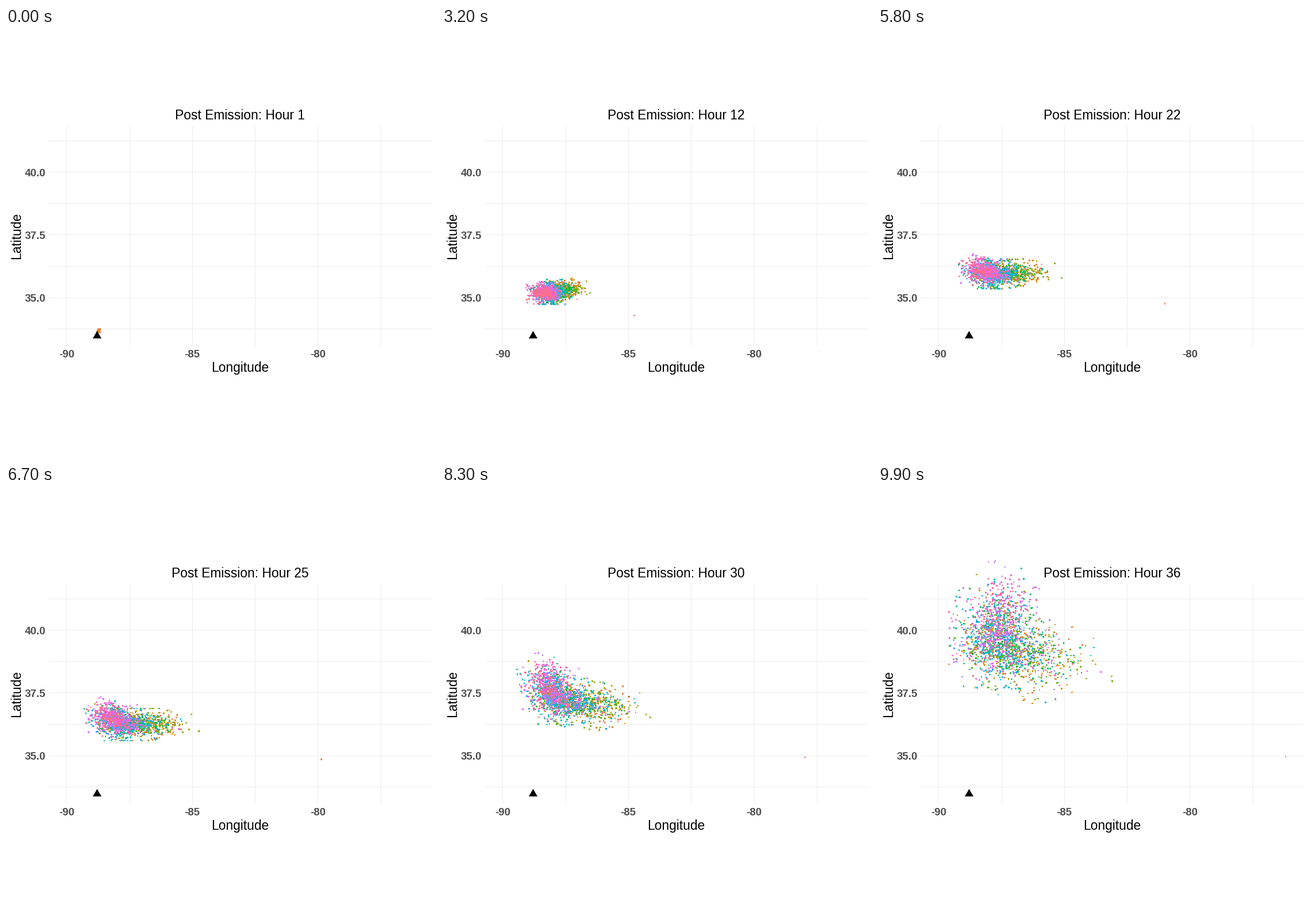
Recreate the animation shown at these times as a matplotlib script. Size 748x748 px, loop 10000 ms.

```python
import numpy as np
import matplotlib.pyplot as plt
from matplotlib.animation import FuncAnimation

SIZE, DPI, FRAMES = 748, 100, 100
HOURS, COUNT = 36, 2000
PX = 72 / DPI
plt.rcParams["font.family"] = "Liberation Sans"
rng = np.random.default_rng(11)

# ---------- stage ----------
fig = plt.figure(figsize=(SIZE / DPI, SIZE / DPI), dpi=DPI, facecolor="white")
ax = fig.add_axes([0, 0, 1, 1])
ax.set(xlim=(0, SIZE), ylim=(SIZE, 0))
ax.axis("off")


def lon_x(lon):
    return 105.3 + (lon + 90) * 43.7


def lat_y(lat):
    return 250.3 + (40 - lat) * 43.66


def label(x, y, text, size=22.8, **kw):
    kw = {"ha": "center", "va": "baseline", "color": "black", **kw}
    return ax.text(x, y, text, fontsize=size * PX, **kw)


grid = dict(color="#ebebeb", lw=PX, zorder=1, solid_capstyle="butt")
for lon in np.arange(-90, -77, 2.5):
    ax.plot([lon_x(lon)] * 2, [169, 553], **grid)
for lat in np.arange(33.75, 41.5, 1.25):
    ax.plot([74, 740], [lat_y(lat)] * 2, **grid)

tick = dict(size=18.67, color="#4d4d4d", weight="bold")
for lon in (-90, -85, -80):
    label(lon_x(lon), 573, f"{lon}", **tick)
for lat in (35, 37.5, 40):
    label(69, lat_y(lat) + 7.2, f"{lat:.1f}", ha="right", **tick)
label(407, 598, "Longitude")
label(25, 361, "Latitude", rotation=90, rotation_mode="anchor")
title = label(407, 159, "")
ax.fill([158.5, 151, 166], [527, 540, 540], color="black", lw=0, zorder=5)


def hue_colors(k, chroma=100, lum=65):
    """Evenly spaced hues of equal lightness in LUV."""
    h = np.radians(15 + 360 * k)
    u = chroma * np.cos(h) / (13 * lum) + 0.1978
    v = chroma * np.sin(h) / (13 * lum) + 0.4683
    Y = ((lum + 16) / 116) ** 3
    X = Y * 9 * u / (4 * v)
    Z = Y * (12 - 3 * u - 20 * v) / (4 * v)
    m = np.array([[3.2406, -1.5372, -0.4986],
                  [-0.9689, 1.8758, 0.0415],
                  [0.0557, -0.2040, 1.0570]])
    lin = np.clip(np.stack([X, np.full_like(X, Y), Z], 1) @ m.T, 0, 1)
    return np.where(lin > 0.0031308, 1.055 * lin ** (1 / 2.4) - 0.055, 12.92 * lin)


def ranked(v):
    """Ranks spread over -1 (head) to 1 (tail)."""
    return 2 * v.argsort().argsort() / (len(v) - 1) - 1


# ---------- particles, in order of release ----------
hue = np.sort(rng.random(COUNT))
colors = hue_colors(hue)
birth = 0.6 + 3.2 * hue
early = ranked(0.22 * rng.normal(size=COUNT) - hue)
late = ranked(0.5 * rng.normal(size=COUNT) - hue)
dx, dy = np.clip(rng.standard_t(6, (2, COUNT)), -3.1, 3.1)

SOURCE = np.array([158, 531])
GROWN = 7.7  # hour at which the puff is fully formed


def hour_at(i):
    return 1 + (HOURS - 1) * i / (FRAMES - 1)


def plume(t):
    """Cloud at drift time t in 0..1: the head rises, the tail trails east."""
    ease = t * (2 - t)
    s = early + (late - early) * ease
    tail, head = np.clip(s, 0, 1) ** 1.7, np.clip(-s, 0, 1) ** 1.7
    x = (183 + 18 * ease + (22 + 85 * ease) * tail
         + (-20 - 20 * t + 60 * t ** 8) * head)
    y = (477 - 95 * t - 105 * t ** 6 + (45 * t ** 3 - 10) * tail
         - 80 * t ** 2.3 * head)
    sx = (7 + 7 * ease + 11 * t ** 8) * (1 + 0.5 * ease * tail)
    sy = 5.5 + 4 * t + 14 * t ** 5
    pos = np.stack([x + sx * dx, y + sy * dy], 1)
    # one particle caught by a faster wind
    pos[0] = 205 + 504 * t ** 0.75, 516 - 45 * (1 - (1 - t) ** 2.5)
    return pos


def positions(hour):
    if hour >= GROWN:
        return plume((hour - GROWN) / (HOURS - GROWN)), np.ones(COUNT, bool)
    f = np.clip((hour - birth) / (GROWN - birth), 0, 1) ** 0.75
    return SOURCE + (plume(0) - SOURCE) * f[:, None], birth <= np.floor(hour)


dots = ax.scatter([], [], marker="s", s=(1.6 * PX) ** 2, linewidths=0,
                  antialiased=False, snap=False, zorder=3)


def update(i):
    hour = hour_at(i)
    pos, shown = positions(hour)
    dots.set_offsets(pos[shown])
    dots.set_facecolor(colors[shown])
    title.set_text(f"Post Emission: Hour {int(hour + 0.5)}")
    return dots, title


anim = FuncAnimation(fig, update, frames=FRAMES, interval=100, repeat=True,
                     repeat_delay=0, blit=False)
plt.show()
```
